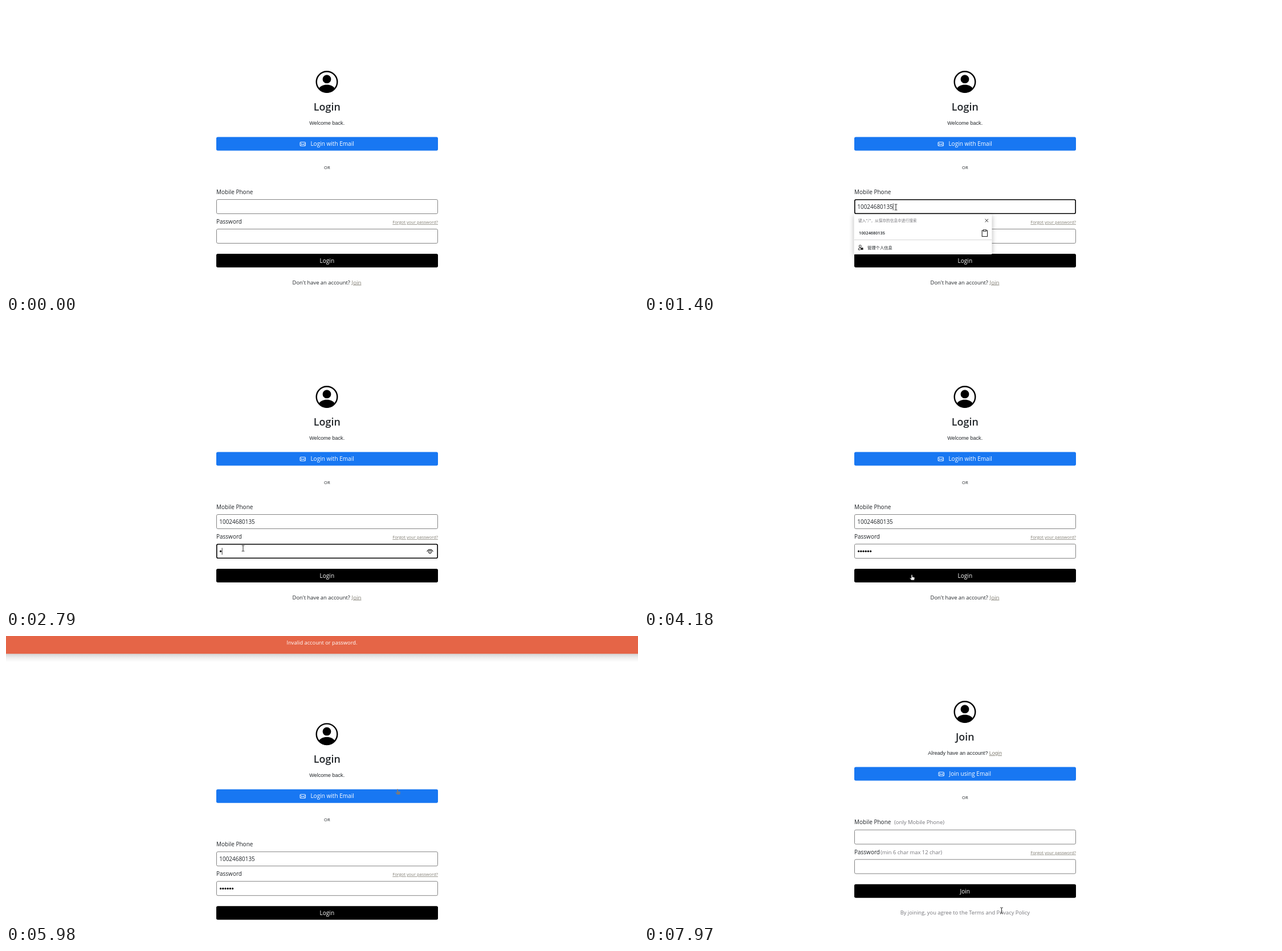
Recreate the animation shown at these times as an HTML page. Size 1109 px wide and 505 px high, loop 8000 ms.

```html
<!DOCTYPE html>
<html lang="en">
<head>
<meta charset="utf-8">
<title>Login form</title>
<style>
  html, body { margin: 0; height: 100%; overflow: hidden; background: #fff; }
  svg { display: block; width: 100vw; height: 100vh; }
  text { font-family: "Open Sans", "Noto Sans", sans-serif; fill: #212529; white-space: pre; }
  .plain { font-family: "Liberation Sans", sans-serif; }
  .cjk { font-family: "Noto Sans CJK SC", "Noto Sans CJK", sans-serif; }
  .bold { font-weight: 600; }
  .white { fill: #fff; }
  .muted { fill: #75757a; }
  .link { fill: #807d73; text-decoration: underline; }
  .mid { text-anchor: middle; }
  .end { text-anchor: end; }
  .line { fill: none; stroke: #222; }
  .popup { filter: drop-shadow(0 2px 4px rgba(0, 0, 0, .3)); }
</style>
</head>
<body>
<svg id="stage" viewBox="0 0 1109 505">
  <defs>
    <linearGradient id="shade" x2="0" y2="1">
      <stop stop-color="#000" stop-opacity=".17"/>
      <stop offset=".5" stop-color="#000" stop-opacity=".06"/>
      <stop offset="1" stop-color="#000" stop-opacity="0"/>
    </linearGradient>
  </defs>
  <g id="view"></g>
</svg>
<script>
const LOOP = 8000;
const PHONE = '10024680135';
const view = document.getElementById('view');

// Each step changes part of the state and holds until the next one.
const steps = [
  [0, { page: 'login', digits: 0, dots: 0, focus: '', caret: true, popup: false, eye: false, banner: false, cursor: null }],
  [200, { cursor: ['beam', 470, 405] }],
  [400, { cursor: ['beam', 442, 354], focus: 'phone', popup: true }],
  [600, { digits: 4 }],
  [800, { digits: 8 }],
  [1000, { digits: 11, caret: false }],
  [1400, { caret: true }],
  [1600, { cursor: ['arrow', 362, 371] }],
  [1800, { cursor: ['arrow', 307, 388], popup: false, focus: '' }],
  [2000, { cursor: ['arrow', 352, 396] }],
  [2200, { cursor: ['beam', 416, 400], focus: 'pass' }],
  [2400, { caret: false }],
  [2590, { caret: true }],
  [2790, { dots: 1, eye: true }],
  [2990, { dots: 2 }],
  [3190, { dots: 4 }],
  [3390, { dots: 5 }],
  [3590, { dots: 6 }],
  [3790, { cursor: ['beam', 452, 412] }],
  [3990, { cursor: ['hand', 470, 446], focus: '', eye: false }],
  [4190, { banner: true }],
  [4380, { cursor: ['beam', 470, 451] }],
  [4580, { cursor: ['arrow', 535, 380] }],
  [4780, { cursor: ['arrow', 597, 314] }],
  [4980, { cursor: ['hand', 687, 269] }],
  [5380, { cursor: ['arrow', 790, 206], ghost: true }],
  [5580, { cursor: ['arrow', 960, 96] }],
  [5780, { cursor: ['arrow', 1068, 27] }],
  [5980, { cursor: null }],
  [6580, { banner: false, ghost: false }],
  [6780, { cursor: ['arrow', 1010, 90] }],
  [6980, { cursor: ['arrow', 860, 240] }],
  [7170, { cursor: ['arrow', 720, 390] }],
  [7370, { cursor: ['arrow', 640, 465] }],
  [7570, { cursor: ['hand', 616, 487] }],
  [7770, { page: 'join', digits: 0, dots: 0 }],
  [7970, { cursor: ['beam', 627.5, 483] }],
];

const text = (x, y, size, str, cls = '') =>
  `<text x="${x}" y="${y}" font-size="${size}" class="${cls}">${str}</text>`;
const path = (d, width = 1, extra = 'class="line"') =>
  `<path d="${d}" stroke-width="${width}" ${extra}/>`;
const button = (y, fill) =>
  `<rect x="369" y="${y}" width="389" height="24" rx="2.7" fill="${fill}"/>`;
const move = (x, y, body) => `<g transform="translate(${x} ${y})">${body}</g>`;

function field(y, focused) {
  const [inset, width, color] = focused ? [.8, 1.6, '#000'] : [.5, .9, '#777'];
  return `<rect x="${369 + inset}" y="${y + inset}" width="${389 - 2 * inset}" height="${26 - 2 * inset}"
    rx="2.3" fill="#fff" stroke="${color}" stroke-width="${width}"/>`;
}

const caretAt = (x, y) => path(`M${x} ${y}v12`, .9);

const avatar = `<circle cx="563" cy="133.5" r="18.3" fill="none" stroke="#000" stroke-width="2.4"/>
  <circle cx="563" cy="128.7" r="7.4"/>
  <path d="M548.5 146C551.5 140.5 557 138.6 563 138.6S574.5 140.5 577.5 146A18.8 18.8 0 0 1 548.5 146"/>`;

const envelope = x => move(x, 239,
  path('M1.5 .5H9Q10 .5 10 1.5V6.2Q10 7.2 9 7.2H1.5Q.5 7.2 .5 6.2V1.5Q.5 .5 1.5 .5M.5 2L5.25 4.7L10 2M.7 6.7L4 4.2M9.8 6.7L6.5 4.2',
    .9, 'fill="none" stroke="#fff"'));

const eyeIcon = path('M738.8 406C740.5 400.8 747.5 400.8 749.2 406', 1.1) +
  '<circle cx="744" cy="406.3" r="2.3" fill="none" stroke="#222" stroke-width="1.1"/>';

const popup = `<rect x="368.5" y="366.5" width="242" height="70.5" rx="1.5" fill="#fff" class="popup"/>` +
  text(376, 380, 6.7, '键入"/"，从保存的信息中进行搜索', 'cjk muted') +
  path('M598.6 374.8l5.4 5.4m0-5.4l-5.4 5.4') +
  text(377, 402.3, 7.3, PHONE, 'bold') +
  path('M595.5 395H593.2V405.5H602.6V395H600.3M595.5 393.8H600.3V396.2H595.5Z', 1.1) +
  path('M369 411.5H610', .8, 'stroke="#ccc"') +
  path('M376.3 429V427.8Q376.3 425.7 378.5 425.7H380M376.3 429H379.5') +
  '<circle cx="379.3" cy="422.6" r="1.9" class="line"/>' +
  '<rect x="380.2" y="425.2" width="4.4" height="3.9" rx=".6" fill="#222"/>' +
  text(392, 427.7, 7.3, '管理个人信息', 'cjk');

const handPath = 'M-1 1Q0-.7 1 1V4.2L4.2 5Q5.2 5.3 5 6.6L4.3 10H-.9L-3.6 6.5Q-3.2 5.2-1 6.7Z';
const cursors = {
  beam: path('M-2.3-5H-.7L0-4.5L.7-5H2.3M0-4.5V4.5M-2.3 5H-.7L0 4.5L.7 5H2.3', 1),
  arrow: path('M0 0V10.5L2.5 8.2L4.2 12L5.8 11.3L4.2 7.7H7.5Z', .8, 'fill="#fff" stroke="#222"'),
  hand: path(handPath, .8, 'fill="#fff" stroke="#222"'),
};

const banner = `<rect y="31" width="1109" height="15" fill="url(#shade)"/>
  <rect width="1109" height="31.3" fill="#e56547"/>` +
  text(554.5, 14.6, 9.3, 'Invalid account or password.', 'white mid');

function form(s) {
  const join = s.page === 'join';
  const drop = join ? .7 : 0;
  const name = join ? 'Join' : 'Login';
  let fields = field(340, s.focus === 'phone') +
    text(374.3, 356.6, 9.95, PHONE.slice(0, s.digits)) +
    text(369, 383, 10, 'Password') +
    text(758, 383, 7.52, 'Forgot your password?', 'link end') +
    field(392, s.focus === 'pass') +
    button(436, '#000') + text(563.3, 452, 10.1, name, 'white mid');
  for (let i = 0; i < s.dots; i++)
    fields += `<circle cx="${376.6 + 4.2 * i}" cy="405.2" r="1.6"/>`;
  if (s.eye) fields += eyeIcon;
  if (s.focus && s.caret)
    fields += s.focus === 'phone' ? caretAt(374.5 + 5.7 * s.digits, 347.3) : caretAt(375 + 4.2 * s.dots, 399.3);

  const extras = join
    ? text(498.3, 209, 9.1, 'Already have an account?', 'plain') +
      text(605.7, 209, 9.1, 'Login', 'plain link') +
      text(439, 331, 9.5, '(only Mobile Phone)', 'muted') +
      text(415, 383.7, 9.4, '(min 6 char max 12 char)', 'muted') +
      text(563.3, 490.2, 9.35, 'By joining, you agree to the Terms and Privacy Policy', 'muted mid')
    : text(563.2, 209, 9.1, 'Welcome back.', 'plain mid') +
      text(502.6, 489.5, 9.37, "Don't have an account?") +
      text(606.6, 489.5, 9.7, 'Join', 'link');

  return avatar + text(563.3, 184, 17.9, name, 'bold mid') +
    button(230.5, '#1877f2') + envelope(join ? 516.5 : 515.5) +
    text(join ? 535.5 : 534.4, 246.2, 10.06, join ? 'Join using Email' : 'Login with Email', 'white') +
    text(563.3, 287, 7.5, 'OR', 'mid') +
    text(369, 331, 10, 'Mobile Phone') +
    move(0, drop, fields) + extras + (s.popup ? popup : '');
}

function draw(s) {
  let out = move(0, s.banner ? 39.2 : 0, form(s));
  if (s.banner) out += banner;
  if (s.ghost) out += move(687, 269, path(handPath, 0, 'fill="#777b80"'));
  if (s.cursor) {
    const [kind, x, y] = s.cursor;
    out += move(x, y, cursors[kind]);
  }
  view.innerHTML = out;
}

let shown = -1;
function tick() {
  const t = performance.now() % LOOP;
  const count = steps.filter(([at]) => at <= t).length;
  if (count !== shown) {
    shown = count;
    draw(Object.assign({}, ...steps.slice(0, count).map(step => step[1])));
  }
  requestAnimationFrame(tick);
}
tick();
</script>
</body>
</html>
```
